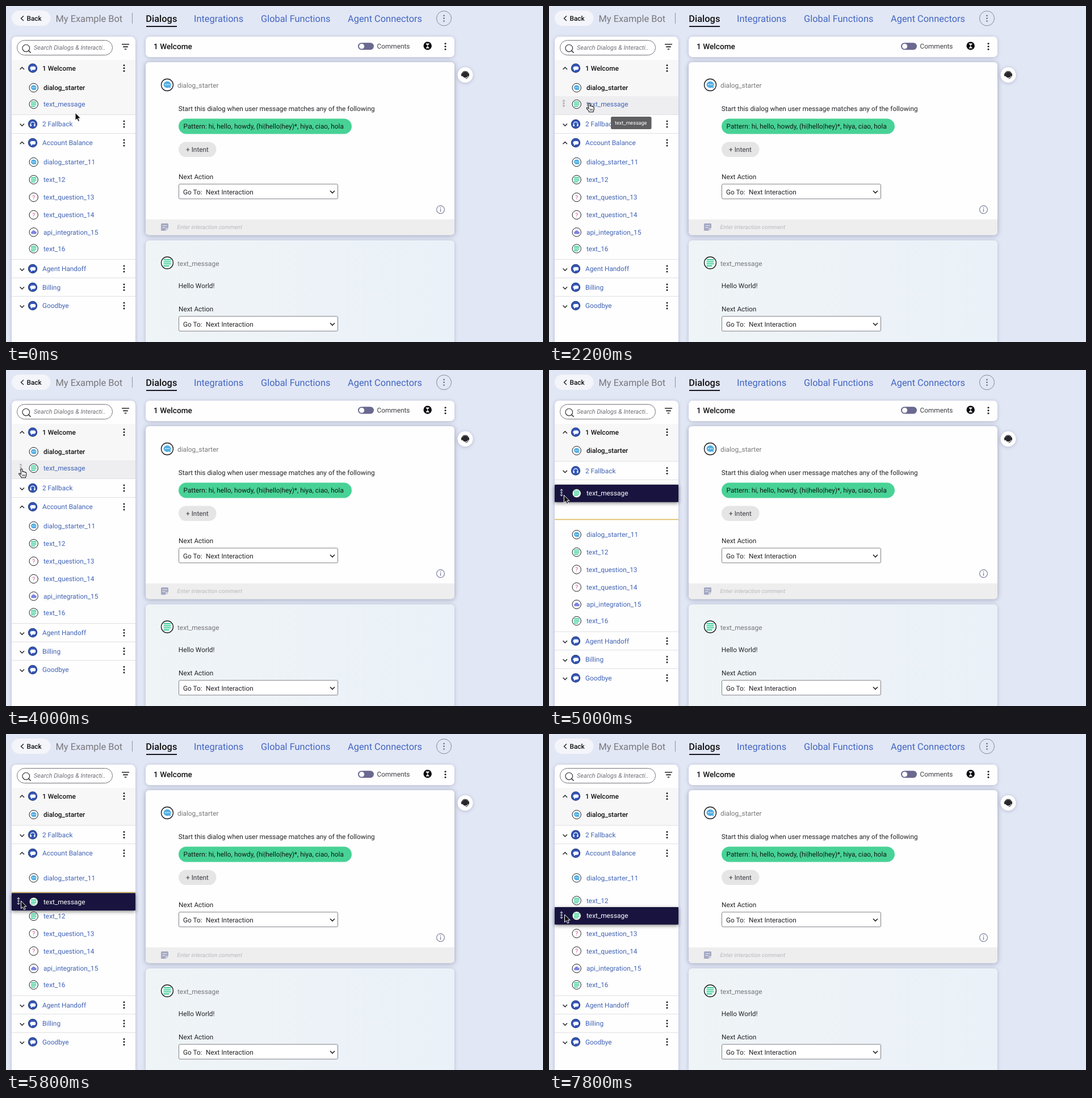
Write an HTML page that moves like this. It is 946 px wide and 592 px high and loops after 8 s.

```html
<!DOCTYPE html>
<html lang="en">
<head>
<meta charset="utf-8">
<title>Dialog editor</title>
<style>
html, body { margin: 0; width: 100%; height: 100%; overflow: hidden; background: #e2e7f5; }
svg { display: block; width: 946px; height: 592px; }
text { font: 11.83px Roboto, sans-serif; fill: #242428; text-rendering: geometricPrecision; white-space: pre; }
.nav { font-size: 16.4px; fill: #4266c2; }
.gray { fill: #77777b; }
.link { fill: #4163b4; }
.mid { font-weight: 500; fill: #111; }
.white { fill: #fff; }
.hint { font-style: italic; font-size: 10px; fill: #b9b9bd; }
.card { filter: drop-shadow(0 1px 3px #2b30553d); }
.line { fill: none; stroke: #222; stroke-width: 1.4; }
</style>
</head>
<body>
<svg id="stage" viewBox="0 0 946 592" xmlns="http://www.w3.org/2000/svg"></svg>
<script>
const STEP = 200, LOOP = 8000;
const stage = document.getElementById('stage');

const text = (x, y, s, cls = '', extra = '') => `<text x="${x}" y="${y}" class="${cls}" ${extra}>${s}</text>`;
const box = (x, y, w, h, r, fill, extra = '') =>
  `<rect x="${x}" y="${y}" width="${w}" height="${h}" rx="${r}" fill="${fill}" ${extra}/>`;
const disc = (x, y, r, fill, extra = '') => `<circle cx="${x}" cy="${y}" r="${r}" fill="${fill}" ${extra}/>`;
const path = (d, extra = 'class="line"') => `<path d="${d}" ${extra}/>`;
const at = (x, y, body, scale = 1) => `<g transform="translate(${x} ${y}) scale(${scale})">${body}</g>`;
const dots = (x, y, gap, r, fill = '#222') => [-gap, 0, gap].map(d => disc(x, y + d, r, fill)).join('');

const ring = disc(0, 0, 7.7, '#fff', 'stroke="#1c1c22" stroke-width="1"');
const badge = disc(0, 0, 8.2, '#27407f') + disc(0, 0, 7, '#3557ba');
const icons = {
  chat: ring + path('M-4.8 -.3A4.8 4.3 0 1 1 2.6 3.4L4.6 4.8 4.2 2.2 2.6 3.4A5 4.5 0 0 1 -4.8 -.3Z', 'fill="#4fade2"')
    + [-2.3, 0, 2.3].map(x => disc(x, -.3, .75, '#fff')).join(''),
  lines: ring + path('M-4.8 -3.9H4.8M-4.8 -1.3H4.8M-4.8 1.3H4.8M-4.8 3.9H2.6', 'stroke="#3fcf9a" stroke-width="1.6"'),
  ask: ring + text(0, 3.9, '?', '', 'text-anchor="middle" style="font-size:10.5px;fill:#d0558c"'),
  cloud: ring + path('M-3 3.2A2.3 2.3 0 0 1 -3 -1.2A3.2 3.2 0 0 1 3 -1.2A2.2 2.2 0 0 1 3 3.2Z', 'fill="#7d83e0"'),
  talk: badge + path('M-4.6 .5A3.2 3.2 0 0 1 -1.4 -3H2.2A3 3 0 0 1 2.2 3H-.2L-3 5V2.6A3 3 0 0 1 -4.6 .5Z', 'fill="#fff"'),
  phones: badge + path('M-3.7 2V0A3.7 3.7 0 0 1 3.7 0V2', 'fill="none" stroke="#fff" stroke-width="1.2"')
    + box(-4.5, .5, 2.3, 3.6, .8, '#fff') + box(2.2, .5, 2.3, 3.6, .8, '#fff')
};

const handle = color => path('M0 -5.5V5.5M-2.3 -3.5L0 -6 2.3 -3.5M-2.3 3.5L0 6 2.3 3.5M-2 0H2',
  `fill="none" stroke="${color}" stroke-width="1.1"`);

// label, icon, then y while resting and y once the dragged row has left its group
const rows = [
  ['dialog_starter', 'chat', 144, 142],
  ['text_message', 'lines', 173, 173],
  ['dialog_starter_11', 'chat', 275, 290],
  ['text_12', 'lines', 306, 321],
  ['text_question_13', 'ask', 337, 351.5],
  ['text_question_14', 'ask', 368, 382.5],
  ['api_integration_15', 'cloud', 398.5, 413],
  ['text_16', 'lines', 427.5, 442]
];
const groups = [
  ['1 Welcome', 'talk', 109.5, 109.5, true],
  ['2 Fallback', 'phones', 208, 177.5],
  ['Account Balance', 'talk', 241, 210, true],
  ['Agent Handoff', 'talk', 463, 477.5],
  ['Billing', 'talk', 495.5, 510],
  ['Goodbye', 'talk', 528, 542.5]
];

const rowArt = ([name, icon], i) => `<g class="slot">${at(48.7, 0, icons[icon])}${text(66, 4.2, name, i ? 'link' : 'mid')}</g>`;
const groupArt = ([name, icon, , , open], i) => `<g class="slot">
  ${i ? box(10, -17, 218, 1, 0, '#dfe0e4') : ''}
  ${path(open ? 'M24.6 2.2L28.3 -1.5 32 2.2' : 'M24.6 -.5L28.3 3.2 32 -.5')}
  ${at(47, 0, icons[icon])}${text(64, 4.1, name, i ? 'link' : 'mid')}${dots(208, 0, 5, 1.5)}</g>`;

const select = y => text(304, y - 22.5, 'Next Action')
  + box(304.5, y - 13.5, 280, 26, 2, '#fff', 'stroke="#7f7f86"')
  + text(312, y + 4.2, 'Go To:') + text(352, y + 4.2, 'Next Interaction')
  + path(`M571 ${y - 1.8}L575 ${y + 2.2} 579 ${y - 1.8}`, 'class="line" style="stroke-width:1.6"');

const header = box(10, 8, 68.5, 27, 13.5, '#f3f5fa')
  + path('M31 17.5L26.5 21.8 31 26') + text(36.5, 25.8, 'Back', 'mid')
  + text(87.5, 27.7, 'My Example Bot', 'nav gray') + box(222, 12, 1, 19, 0, '#8f929d')
  + text(246.3, 27.8, 'Dialogs', 'nav mid', 'style="fill:#111"') + box(247, 35, 54, 2, 0, '#16161c')
  + text(331, 28, 'Integrations', 'nav') + text(449, 28, 'Global Functions', 'nav')
  + text(602, 28, 'Agent Connectors', 'nav')
  + disc(771.5, 21.8, 13, 'none', 'stroke="#858997"') + dots(771.5, 21.8, 4.8, 1.2, '#555a70');

const sidebar = `<g class="card"><path d="M10 600V62a8 8 0 0 1 8-8H220a8 8 0 0 1 8 8V600Z" fill="#fefefe"/></g>
  <rect id="shade" x="10" y="95" width="218" fill="#f7f7f8"/>
  <rect id="hover" x="10" y="159" width="218" height="32" fill="#eeeef0"/>`
  + box(19.5, 60.5, 168, 26, 13, '#fff', 'stroke="#74747c"')
  + disc(35.3, 74.3, 6.3, 'none', 'stroke="#333" stroke-width="1.2"') + path('M39.8 78.8L43.6 82.5')
  + text(49, 77.3, 'Search Dialogs &amp; Interacti..', 'hint', 'style="font-size:10.92px;fill:#6f6f74"')
  + path('M204 67.5H217M206.2 71.8H214.8M208.7 76H212.3', 'stroke="#222" stroke-width="1.7"')
  + groups.map(groupArt).join('') + rows.map(rowArt).join('')
  + `<g id="grip">${at(26, 171.5, handle('#aaaab2'))}</g>`;

const main = `<g class="card">${box(246, 54, 544, 36, 7, '#fefefe')}</g>`
  + text(260, 76.3, '1 Welcome', 'mid', 'style="font-size:13.65px"')
  + box(620, 64.8, 28, 12.4, 6.2, '#6a6990') + disc(626.6, 71, 4.6, '#fff')
  + text(653.5, 74.8, 'Comments', '', 'style="fill:#3c3c42"')
  + disc(742.7, 70.2, 7.2, '#0c0c10') + path('M739.3 66H746.1L742.7 70.2ZM739.3 74.4H746.1L742.7 70.2Z', 'fill="#fff"')
  + dots(774, 71.2, 5, 1.5)
  + `<g class="card" style="filter:drop-shadow(0 1px 4px #2b305566)">${box(246, 99, 544, 304.5, 6, '#fefefe')}</g>`
  + path('M246 376H790V397.5a6 6 0 0 1-6 6H252a6 6 0 0 1-6-6Z', 'fill="#eeeeef"')
  + at(284, 139, icons.chat, 1.36) + text(302, 144.2, 'dialog_starter', 'gray')
  + text(303.7, 185.2, 'Start this dialog when user message matches any of the following')
  + box(304, 198.5, 305, 27, 13.5, '#48d296')
  + text(312.5, 216.2, 'Pattern: hi, hello, howdy, (hi|hello|hey)*, hiya, ciao, hola', '', 'style="fill:#0d1a14"')
  + box(304, 239.5, 66.5, 26.5, 13.2, '#e5e5e6') + text(317, 256.8, '+ Intent', '', 'style="fill:#3c3c40"')
  + select(327.3)
  + disc(765.5, 358.8, 6.9, 'none', 'stroke="#777c9a" stroke-width="1.1"')
  + path('M765.5 357.5V362.6M765.5 354.8V356.2', 'stroke="#777c9a" stroke-width="1.3"')
  + path('M274.5 383H284.5a1.5 1.5 0 0 1 1.5 1.5V392L282 396H274.5a1.5 1.5 0 0 1-1.5-1.5V384.5a1.5 1.5 0 0 1 1.5-1.5Z', 'fill="#a5a9c3"')
  + path('M275.5 387H283.5M275.5 390.5H280.5M282 396V392H286', 'fill="none" stroke="#eeeeef" stroke-width="1.1"')
  + text(301.5, 392.8, 'Enter interaction comment', 'hint')
  + `<g class="card">${box(246, 413, 544, 200, 6, 'url(#tint)')}</g>`
  + at(284, 452.5, icons.lines, 1.36) + text(302, 457.8, 'text_message', 'gray')
  + text(303.7, 496.8, 'Hello World!') + select(560.3)
  + `<g class="card">${disc(809, 121.5, 13.5, '#fff')}</g>`
  + disc(809, 121, 5.2, '#26262b') + path('M803.2 122A5.9 5.9 0 1 1 814.8 122', 'fill="none" stroke="#26262b" stroke-width="1.2"')
  + box(802, 119, 2.4, 4.8, 1, '#26262b') + box(813.6, 119, 2.4, 4.8, 1, '#26262b')
  + path('M814.5 124Q813.5 128 809.5 128', 'fill="none" stroke="#26262b"');

const overlay = `<rect id="mark" x="10" width="218" height="1.6" fill="#dcb95a"/>
  <g id="drag" style="filter:drop-shadow(0 2px 3px #0007)">${box(10, 0, 218, 30.7, 1, '#18143f')}
    ${at(22, 14, handle('#c8c8d4'))}${at(48.7, 15.3, icons.lines)}${text(66, 19.3, 'text_message', 'white')}</g>
  <g id="tip">${box(109, 195, 71.5, 22, 2.5, '#5f5f61')}${text(116, 209.4, 'text_message', 'white', 'style="font-size:9.1px"')}</g>
  <path id="arrow" d="M0 0V13.6L3.1 10.8 5.2 15.5 7.6 14.4 5.5 9.9H9.6Z" fill="#111" stroke="#fff" stroke-width="1"/>
  <g id="hand"><path d="M-1.4 1.2C-1.4 -.5 1.2 -.5 1.3 1.2L1.6 5.4C2.3 4.5 3.8 4.8 4 5.8C4.8 5.1 6 5.5 6.2 6.5C7.2 6 8.2 6.7 8.2 7.9V11L6.8 15.8H-.3L-1.2 13.6 -4.7 9.6C-5.3 8 -3.4 7.6 -2.5 8.6L-.9 10Z" fill="#fff" stroke="#111" stroke-width="1.1" stroke-linejoin="round"/>
    <path d="M1.5 10V13.5M3.4 10V13.5M5.3 10V13.5" stroke="#111" stroke-width=".8"/></g>`;

stage.innerHTML = `<defs><linearGradient id="tint"><stop stop-color="#eff4f6"/><stop offset="1" stop-color="#eaf1f8"/></linearGradient></defs>`
  + header + sidebar + main + overlay;

const $ = id => document.getElementById(id);
const slots = [...stage.querySelectorAll('.slot')];
const place = (el, x, y) => el.setAttribute('transform', `translate(${x} ${y})`);
const show = (el, on) => el.setAttribute('visibility', on ? 'visible' : 'hidden');

const DRAG = 4400, LEAVE = 5000, PASS = [5800, 6200];
const pointer = [
  [0, 122, 188], [600, 115, 193], [800, 115, 193], [1000, 106, 186], [2000, 73, 172],
  [2200, 71, 171], [2400, 71, 171], [3600, 30, 174], [4000, 27.5, 174], [4400, 26, 176],
  [5400, 26.5, 250], [5800, 26.5, 294], [6600, 28.5, 317], [7800, 27.5, 318]
];
const lift = [[4400, 159], [5000, 202], [5400, 232.3], [5800, 280.3], [6600, 304], [7800, 305]];

// linear value of each column of a keyed table
function sample(table, t) {
  const i = table.findIndex(k => k[0] > t);
  if (i < 0) return table[table.length - 1].slice(1);
  if (!i) return table[0].slice(1);
  const a = table[i - 1], b = table[i], p = (t - a[0]) / (b[0] - a[0]);
  return a.slice(1).map((v, j) => v + (b[j + 1] - v) * p);
}

function draw(t) {
  const left = t >= LEAVE, dragging = t >= DRAG;
  const hover = t >= 1000 && !dragging;
  const passed = PASS.filter(p => t >= p).length;

  [...groups, ...rows].forEach((r, i) => {
    let y = r[left ? 3 : 2];
    if (r[0] === 'dialog_starter_11' && passed > 0) y = 253.5;
    if (r[0] === 'text_12' && passed > 1) y = 293.5;
    place(slots[i], 0, y);
  });
  show(slots[groups.length + 1], !dragging);
  $('shade').setAttribute('height', left ? 66 : 96);
  show($('hover'), hover);
  show($('grip'), hover);
  show($('tip'), t >= 1400 && t < 2800);
  show($('mark'), left);
  $('mark').setAttribute('y', [262.6, 278.6, 333.8][passed]);
  show($('drag'), dragging);
  place($('drag'), 0, sample(lift, t)[0]);

  const [x, y] = sample(pointer, t);
  show($('arrow'), !hover);
  show($('hand'), hover);
  place($(hover ? 'hand' : 'arrow'), x, y);
}

const start = performance.now();
function tick() {
  const t = (performance.now() - start) % LOOP;
  draw(Math.floor(t / STEP) * STEP);
  requestAnimationFrame(tick);
}
tick();
</script>
</body>
</html>
```
